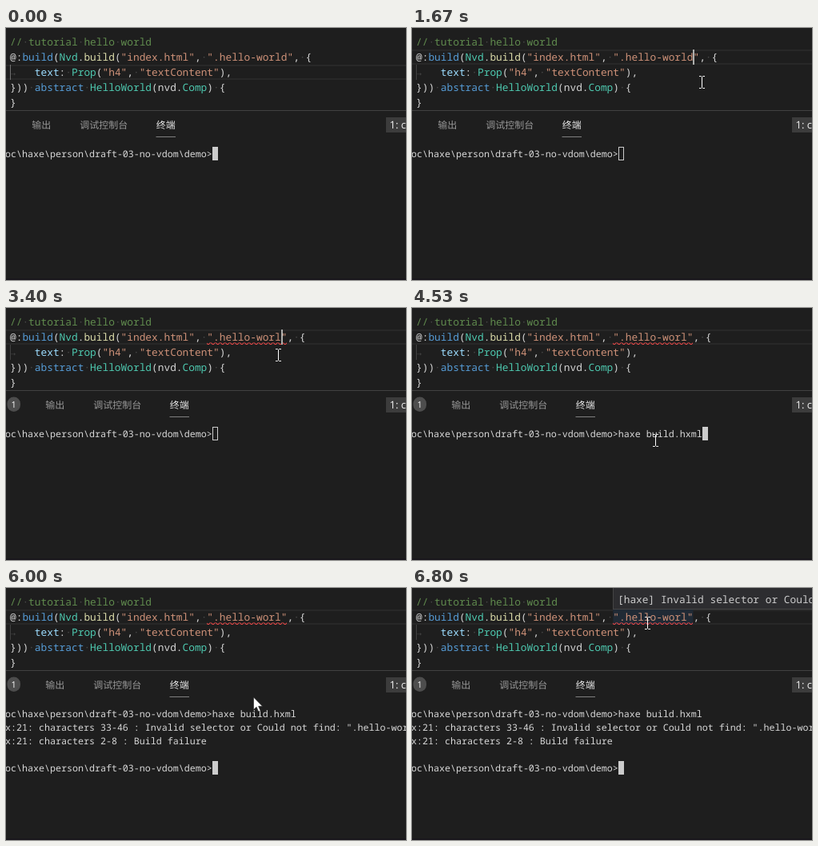
Recreate the animation shown at these times as an HTML page. Size 500 by 316 pixels, loop 8000 ms.

```html
<!DOCTYPE html>
<html lang="en">
<head>
<meta charset="utf-8">
<title>Editor and terminal</title>
<style>
  html, body { margin: 0; width: 100%; height: 100%; overflow: hidden; background: #1e1e1e; }
  svg { display: block; width: 100%; height: 100%; }
  text { white-space: pre; text-rendering: geometricPrecision; }
  .code { font: 12.833px "Noto Sans Mono", monospace; fill: #d4d4d4; }
  .term { font: 11.667px "Noto Sans Mono", monospace; fill: #d8d8d8; }
  .tab { font: 12px "Noto Sans CJK SC", "Noto Sans CJK", sans-serif; fill: #979797; }
  .ui { font: 13px "Open Sans", sans-serif; fill: #f0f0f0; }
</style>
</head>
<body>
<svg id="stage" viewBox="0 0 500 316">
  <defs>
    <pattern id="wave" x="251" y="43" width="6" height="3" patternUnits="userSpaceOnUse">
      <path fill="#ea4646" d="M5.5 0 2.5 3H1.1L4.1 0ZM4 0 6 2V.6L5.4 0ZM0 2 1 3H2.4L0 .6Z"/>
    </pattern>
  </defs>
  <rect width="500" height="316" fill="#1e1e1e"/>
  <rect y="314" width="500" height="2" fill="#19171c"/>

  <rect id="line" x="-2" width="504" height="17" fill="none" stroke="#282828" stroke-width="2"/>
  <rect id="guide" x="5" y="46" width="1" height="19"/>
  <g id="words" fill="#474747">
    <rect x="143.6" y="8" width="38.5" height="19"/>
    <rect x="313" y="27" width="38.5" height="19"/>
  </g>
  <rect id="hover" x="251.4" y="27" width="100" height="19" fill="#202a35"/>
  <g id="code"></g>
  <rect id="squiggle" x="251" y="43" width="100" height="3" fill="url(#wave)"/>
  <rect id="caret" y="27" width="2" height="19" fill="#aeafad"/>

  <rect y="103" width="500" height="1" fill="#414141"/>
  <g id="badge">
    <rect x="1.5" y="111.5" width="16.5" height="18.5" rx="8.25" fill="#4d4d4d"/>
    <text class="ui" x="9.7" y="125" text-anchor="middle" style="font-size:11px;fill:#fff">1</text>
  </g>
  <g id="tabs">
    <text class="tab" x="32.3" y="126">输出</text>
    <text class="tab" x="92.3" y="126">调试控制台</text>
    <text class="tab" x="187.7" y="126" style="fill:#e7e7e7">终端</text>
    <rect x="187.5" y="136" width="24.5" height="1" fill="#808080"/>
  </g>
  <rect x="475" y="112" width="30" height="19" fill="#3c3c3c"/>
  <text class="ui" id="shell" x="479.5" y="126"></text>

  <g id="terminal"></g>
  <rect id="block" fill="#cccccc" stroke="#cccccc"/>

  <g id="tip">
    <rect x="251.5" y="-1.5" width="260" height="28" fill="#2d2d30" stroke="#454545"/>
    <text class="code" x="257" y="19" style="fill:#cccccc">[haxe] Invalid selector or Could not find</text>
  </g>

  <g id="mouse">
    <path id="beam" fill="none" stroke="#fff" d="M-3.5-7.5H-1L0-6.5 1-7.5H3.5M0-6.5V6.5M-3.5 7.5H-1L0 6.5 1 7.5H3.5"/>
    <path id="arrow" fill="#fff" stroke="#222" stroke-width=".6" d="M0 0V15.5L3.6 12.2 6.2 18 8.6 17 6.1 11.3H11Z"/>
  </g>
</svg>
<script>
const NS = "http://www.w3.org/2000/svg";
const LOOP = 8000, STEP = 200 / 3;
const CELL = 7.7, LEFT = 5;
const $ = id => document.getElementById(id);
const set = (id, attrs) => { for (const k in attrs) $(id).setAttribute(k, attrs[k]); };
const show = (id, on) => set(id, { visibility: on ? "visible" : "hidden" });

function add(parent, tag, attrs, content = "") {
  const el = document.createElementNS(NS, tag);
  for (const k in attrs) el.setAttribute(k, attrs[k]);
  el.textContent = content;
  return parent.appendChild(el);
}

// Code: one list of [text, colour] tokens per line; spaces become faint dots.
const PLAIN = "#d4d4d4", BLUE = "#569cd6", TEAL = "#4ec9b0", TEXT = "#ce9178",
      FUNC = "#dcdcaa", NOTE = "#608b4e", DOT = "#484848";

function codeLine(row, col, tokens) {
  const line = add($("code"), "text", { class: "code", x: LEFT + col * CELL, y: 22 + row * 19 });
  const spans = [];
  for (const [word, fill] of tokens)
    for (const part of word.split(/( )/))
      if (part) spans.push(add(line, "tspan", { fill: part === " " ? DOT : fill }, part === " " ? "·" : part));
  return spans;
}

codeLine(0, 0, [["// tutorial hello world", NOTE]]);
const selector = codeLine(1, 0, [
  ["@:", PLAIN], ["build", BLUE], ["(", PLAIN], ["Nvd", TEAL], [".", PLAIN], ["build", FUNC], ["(", PLAIN],
  ['"index.html"', TEXT], [", ", PLAIN], ['".hello-world"', TEXT], [", {", PLAIN]
]).find(s => s.textContent.includes("hello"));
codeLine(2, 0, [["→", DOT]]);
codeLine(2, 4, [
  ["text", "#9cdcfe"], [": ", PLAIN], ["Prop", TEAL], ["(", PLAIN], ['"h4"', TEXT], [", ", PLAIN],
  ['"textContent"', TEXT], ["),", PLAIN]
]);
codeLine(3, 0, [
  ["})) ", PLAIN], ["abstract ", BLUE], ["HelloWorld", TEAL], ["(nvd.", PLAIN], ["Comp", TEAL], [") {", PLAIN]
]);
codeLine(4, 0, [["}", PLAIN]]);

// Terminal
const PROMPT = "oc\\haxe\\person\\draft-03-no-vdom\\demo>";
const COMMAND = "haxe build.hxml";
const OUTPUT = [
  'x:21: characters 33-46 : Invalid selector or Could not find: ".hello-worl"',
  "x:21: characters 2-8 : Build failure", "", PROMPT
];
const rows = Array.from({ length: 5 }, (_, i) =>
  add($("terminal"), "text", { class: "term", x: -1, y: 161.5 + i * 17 }));

// Pointer path: [step, x, y]
const PATH = [
  [3, 470, 295], [4, 430, 230], [5, 380, 150], [6, 335, 85], [7, 300, 45], [8, 287, 30],
  [9, 287, 30], [18, 350, 37], [22, 350, 37], [23, 360, 64], [24, 360, 64], [25, 362, 68],
  [45, 362, 68], [51, 340, 59], [52, 330, 73], [53, 317, 110], [54, 309, 142], [55, 305, 159],
  [56, 304, 166], [81, 304, 166], [82, 304, 165], [87, 304, 165], [88, 304, 161], [89, 307, 150],
  [90, 309, 137], [92, 309, 112], [94, 304, 78], [96, 298, 53], [98, 294.5, 44]
];

function pointer(n) {
  const i = PATH.findIndex(p => p[0] > n);
  if (i < 0) return PATH[PATH.length - 1].slice(1);
  const [a, ax, ay] = PATH[i - 1], [b, bx, by] = PATH[i];
  const f = (n - a) / (b - a);
  return [ax + (bx - ax) * f, ay + (by - ay) * f];
}

function draw(t) {
  const n = Math.floor((t + 5) / STEP);
  const within = (a, b) => n >= a && n < b;
  const editing = n >= 23, deleted = n >= 34, failed = n >= 49, pasted = n >= 68, done = n >= 85;

  set("line", { y: editing ? 28 : 47 });
  set("guide", { fill: editing ? "#404040" : "#707070" });
  selector.textContent = deleted ? '".hello-worl"' : '".hello-world"';
  show("words", within(28, 34));
  show("caret", within(23, 31) || within(34, 41) || within(49, 56));
  set("caret", { x: deleted ? 344 : 351 });
  show("squiggle", failed);
  show("badge", failed);
  set("tabs", { transform: `translate(${failed ? 17 : 0})` });
  $("shell").textContent = within(73, 86) ? "1: haxe" : "1: cmd";

  rows.forEach((row, i) => {
    row.textContent = i === 0 ? PROMPT + (pasted ? COMMAND : "") : done ? OUTPUT[i - 1] : "";
  });
  const focused = !within(23, 60);
  show("block", !within(72, 85));
  set("block", {
    x: pasted && !done ? 363.5 : 258.5, y: done ? 217.5 : 149.5, width: 6, height: 16,
    "fill-opacity": focused ? 1 : 0
  });

  show("hover", n >= 101);
  show("tip", n >= 101);
  set("tip", { opacity: n === 101 ? 0.5 : 1 });

  const visible = n >= 3;
  show("beam", false);
  show("arrow", false);
  if (visible) {
    const [x, y] = pointer(n);
    show(y > 103 && y < 141 ? "arrow" : "beam", true);
    set("mouse", { transform: `translate(${Math.floor(x) + 0.5} ${Math.round(y)})` });
  }
}

function tick() {
  draw(performance.now() % LOOP);
  requestAnimationFrame(tick);
}
tick();
</script>
</body>
</html>
```
